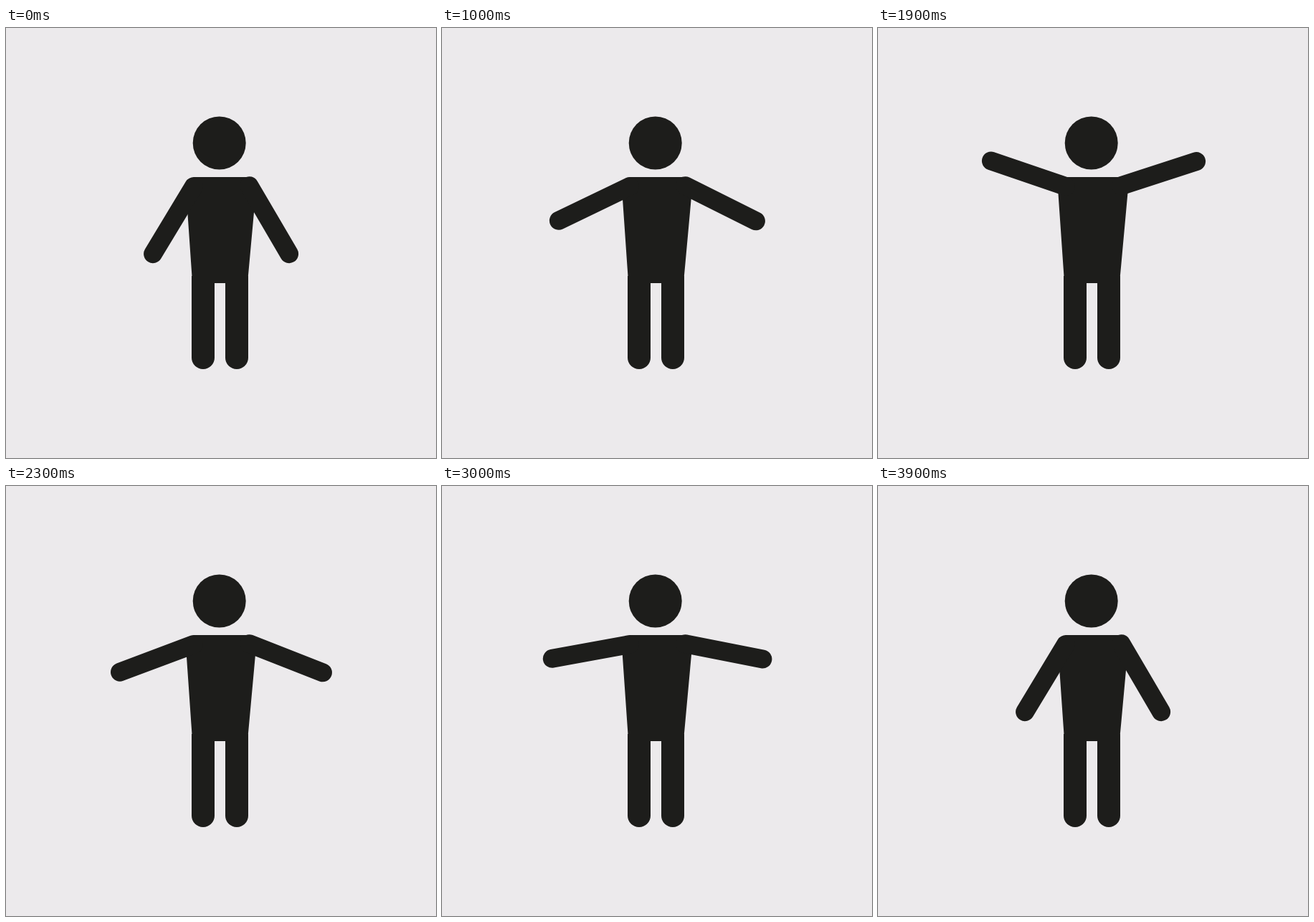
An HTML page that plays this animation: 600x600 px, repeating every 4 s.

```html
<!DOCTYPE html>
<html lang="en">
<head>
<meta charset="utf-8">
<title>Waving figure</title>
<style>
  html, body { margin: 0; width: 100%; height: 100%; overflow: hidden; background: #eceaec; }
  svg { display: block; width: 100vw; height: 100vh; }
  .arm { stroke: #1d1d1b; stroke-width: 26; stroke-linecap: round; }
</style>
</head>
<body>
<svg viewBox="0 0 600 600" fill="#1d1d1b">
  <circle cx="297.7" cy="160.5" r="37"/>
  <path d="M262 208H340L349.3 221L337.8 347V356H259.5V347L250.8 221Z"/>
  <path d="M259 346H291V460a16 16 0 0 1-32 0Z"/>
  <path d="M306 346H338V460a16 16 0 0 1-32 0Z"/>
  <line id="left" class="arm" x1="262" y1="221" x2="262" y2="331"/>
  <line id="right" class="arm" x1="339.5" y1="220.2" x2="339.5" y2="330.2"/>
</svg>
<script>
  const LOOP = 4000, STEP = 100;
  const LOWS = [-35, 1300, 2625, 3935]; // times when the arms hang lowest
  const MID = 70.6, SWING = 40;
  const left = document.getElementById('left');
  const right = document.getElementById('right');

  function armAngle(t) {
    let i = 0;
    while (i < LOWS.length - 2 && t >= LOWS[i + 1]) i++;
    const phase = (t - LOWS[i]) / (LOWS[i + 1] - LOWS[i]);
    return MID - SWING * Math.cos(2 * Math.PI * Math.min(phase, 1));
  }

  function turn(arm, deg) {
    const x = arm.getAttribute('x1'), y = arm.getAttribute('y1');
    arm.setAttribute('transform', `rotate(${deg} ${x} ${y})`);
  }

  function draw() {
    const t = Math.floor(((performance.now() + 1) % LOOP) / STEP) * STEP;
    const a = armAngle(t);
    turn(left, a);
    turn(right, 0.8 - a);
    requestAnimationFrame(draw);
  }
  draw();
</script>
</body>
</html>
```
